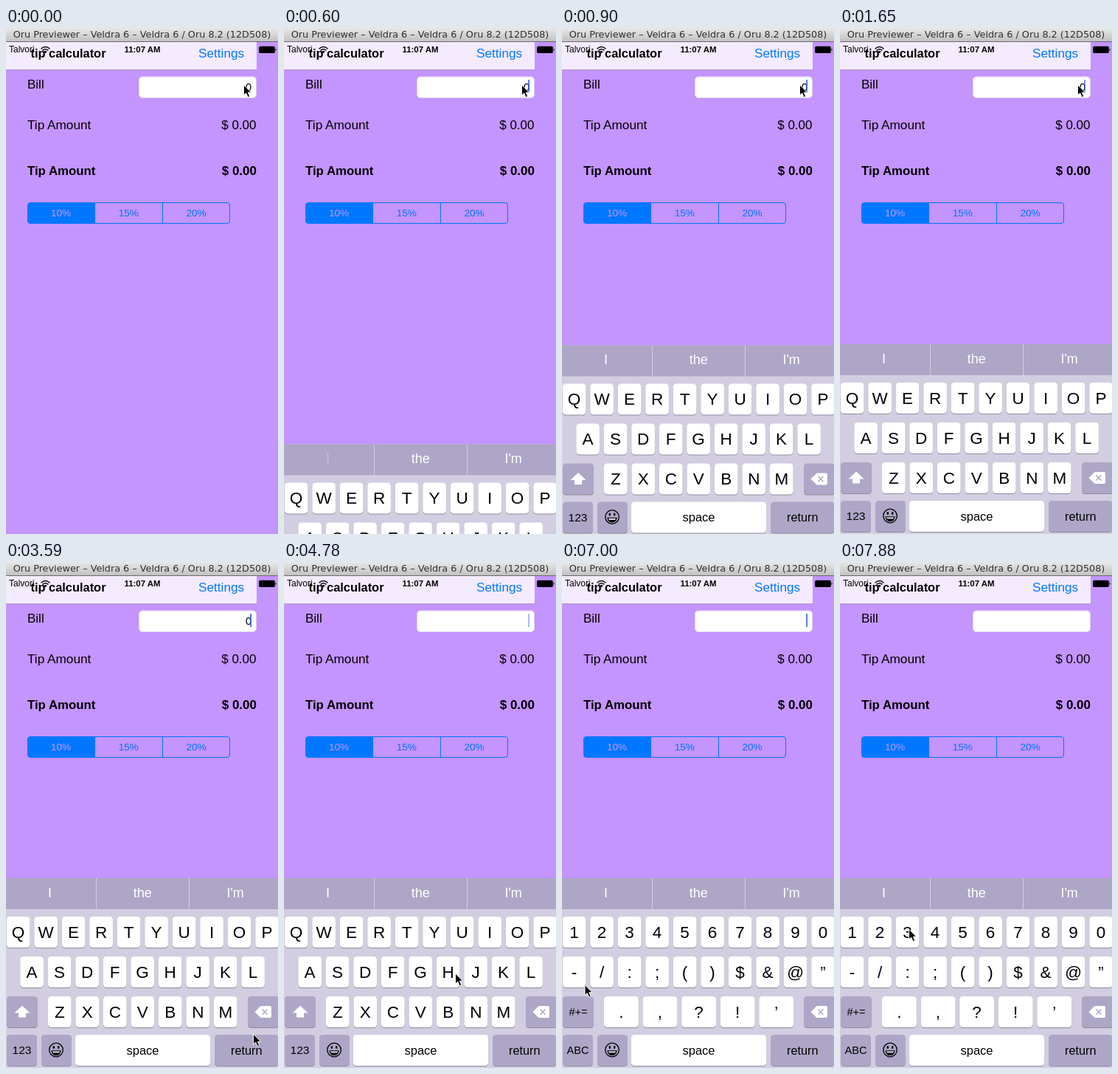
Write an HTML page that moves like this. It is 369x685 px and loops after 8 s.

```html
<!DOCTYPE html>
<html lang="en">
<head>
<meta charset="utf-8">
<title>Tip calculator</title>
<style>
html, body { margin: 0; width: 100%; height: 100%; overflow: hidden; background: #c494ff; }
svg { display: block; width: 100%; height: 100%; }
text { font-family: "Liberation Sans", Arial, sans-serif; white-space: pre; }
.b { font-weight: bold; }
</style>
</head>
<body>
<svg id="stage" viewBox="0 0 369 685">
  <defs>
    <linearGradient id="chrome" x2="0" y2="1">
      <stop offset="0" stop-color="#e8e8e8"/><stop offset="1" stop-color="#c2c2c2"/>
    </linearGradient>
  </defs>
  <rect width="369" height="685" fill="#c494ff"/>
  <g id="app"></g>
  <g id="keyboard"></g>
  <g id="pointer">
    <path d="M0 0V14L3.2 11.1L5.7 16.7L8.2 15.6L5.8 10.2H10.2Z" stroke="#fff" stroke-width="1" stroke-linejoin="round"/>
  </g>
</svg>
<script>
const LOOP = 8000, STEP = 148.6;
const BLUE = '#0077ff', LILAC = '#aea6c6', PALE = '#d2cde0', BG = '#c494ff';
const $ = id => document.getElementById(id);

function add(parent, tag, attrs, label) {
  const el = document.createElementNS('http://www.w3.org/2000/svg', tag);
  for (const k in attrs) el.setAttribute(k, attrs[k]);
  if (label !== undefined) el.textContent = label;
  parent.appendChild(el);
  return el;
}
const rect = (p, x, y, width, height, fill, more) =>
  add(p, 'rect', { x, y, width, height, fill, ...more });
const path = (p, d, attrs) => add(p, 'path', { d, ...attrs });
const write = (p, label, x, y, size, anchor = 'start', more) =>
  add(p, 'text', { x, y, 'font-size': size, 'text-anchor': anchor, ...more }, label);

// App screen
const app = $('app'), bold = { class: 'b' };
rect(app, 0, 19, 340, 37, '#f4ebfe');
rect(app, 0, 56, 340, 1, '#b49bd0');
write(app, 'tip calculator', 33.5, 40, 16.4, 'start', bold);
write(app, 'Settings', 261, 40, 17.2, 'start', { fill: BLUE });
write(app, 'Talvori', 4, 33, 12);
write(app, '11:07 AM', 185, 33, 11.4, 'middle', bold);
const wifi = { fill: 'none', stroke: '#000', 'stroke-width': 1.5 };
path(app, 'M47.5 28.2Q53.5 22.8 59.5 28.2M49.6 30.4Q53.5 27 57.4 30.4', wifi);
path(app, 'M53.5 34.2L51.2 31.9Q53.5 30.2 55.8 31.9Z');
rect(app, 343.2, 24.8, 21.6, 9.2, '#000', { rx: 1.6 });
path(app, 'M365.6 27.6Q367.8 29.4 365.6 31.2Z');

rect(app, 0, 0, 369, 18, 'url(#chrome)');
rect(app, 0, 18, 369, 1, '#6d6676');
write(app, 'Oru Previewer – Veldra 6 – Veldra 6 / Oru 8.2 (12D508)', 184.5, 13, 12.8, 'middle',
  { fill: '#303030', style: 'font-family:"DejaVu Sans",sans-serif' });

write(app, 'Bill', 29, 81.5, 17);
write(app, 'Tip Amount', 29, 136.5, 17.2);
write(app, '$ 0.00', 339.5, 136.5, 17, 'end');
write(app, 'Tip Amount', 29, 199, 16.8, 'start', bold);
write(app, '$ 0.00', 340, 199, 17, 'end', bold);
rect(app, 180.5, 66, 159, 28.5, '#fff', { rx: 4.5, stroke: '#e2d3f3' });
const amount = write(app, '0', 333, 84.5, 14.5, 'end');
const caret = rect(app, 331.3, 70, 1.7, 18, '#3f66ea');

rect(app, 29.5, 236.5, 274, 28, 'none', { rx: 3.5, stroke: BLUE });
path(app, 'M121 236.5H33Q29.5 236.5 29.5 240V261Q29.5 264.5 33 264.5H121Z', { fill: BLUE });
rect(app, 212, 236.5, 1, 28, BLUE);
['10%', '15%', '20%'].forEach((s, i) =>
  write(app, s, 74.5 + i * 91.8, 255, 13.6, 'middle', { fill: i ? BLUE : BG }));

// Keyboard
const kb = $('keyboard');
rect(kb, 0, 428, 369, 257, PALE);
rect(kb, 0, 428, 369, 42, LILAC);
rect(kb, 122, 428, 1, 42, PALE);
rect(kb, 248, 428, 1, 42, PALE);
const [hint] = ['I', 'the', "I'm"].map((s, i) =>
  write(kb, s, 59.5 + i * 125.8, 453.7, 18, 'middle', { fill: '#fff' }));

function key(p, x, y, w, label = '', size = 22.5, fill = '#fff') {
  rect(p, x, y + 1, w, 42, '#918b9f', { rx: 4.5 });
  const face = rect(p, x, y, w, 42, fill, { rx: 4.5 });
  write(p, label, x + w / 2, y + 21 + size * 0.35, size, 'middle');
  return face;
}
const row = (p, chars, x, y, w, pitch) =>
  [...chars].forEach((c, i) => key(p, x + i * pitch, y, w, c));

const letters = add(kb, 'g'), digits = add(kb, 'g');
row(letters, 'QWERTYUIOP', 0.8, 480, 31.6, 37.5);
row(letters, 'ASDFGHJKL', 19.3, 534, 31.6, 37.5);
row(letters, 'ZXCVBNM', 57, 588, 31.6, 37.5);
key(letters, 1, 588, 42, '', 16, LILAC);
path(letters, 'M22 600.5L32.5 610.5H27V616.5H17V610.5H11.5Z', { fill: '#fff' });
key(letters, 1, 640, 41, '123', 15.5, LILAC);

row(digits, '1234567890', 0.8, 480, 31.6, 37.5);
row(digits, '-/:;()$&@”', 0.8, 534, 31.6, 37.5);
row(digits, '.,?!’', 57, 588, 46.8, 52.6);
key(digits, 1, 588, 42, '#+=', 14.5, LILAC);
const modeKey = key(digits, 1, 640, 41, 'ABC', 14.5, LILAC);

const delKey = key(kb, 328, 588, 43, '', 16, LILAC);
const delIcon = path(kb, 'M337.5 609L345 601.5Q345.6 601 346.5 601H358Q360 601 360 603V615Q360 617 358 617H346.5Q345.6 617 345 616.5Z');
const delCross = path(kb, 'M347.5 605.5L354.5 612.5M354.5 605.5L347.5 612.5', { 'stroke-width': 1.5 });
key(kb, 48, 640, 41, '', 16, LILAC);
add(kb, 'circle', { cx: 68, cy: 660.5, r: 9.3, fill: 'none', stroke: '#000', 'stroke-width': 1.3 });
add(kb, 'ellipse', { cx: 64.8, cy: 657, rx: 1.3, ry: 2 });
add(kb, 'ellipse', { cx: 71.2, cy: 657, rx: 1.3, ry: 2 });
path(kb, 'M61.3 661.2H74.7Q73.6 668 68 668Q62.4 668 61.3 661.2Z');
path(kb, 'M62.8 662.3H73.2L72.2 664.6H63.8Z', { fill: PALE });
key(kb, 94, 640, 183, 'space', 16.5);
key(kb, 283, 640, 86.5, 'return', 16.3, LILAC);

// Timelines, counted in steps: pointer [step, x, y], caret [step, opacity]
const moves = [
  [17, 322.5, 77], [19, 316, 175], [21, 314.5, 390], [23, 329, 595], [24, 335.5, 639],
  [25, 336, 628], [26, 335, 615], [31, 335, 615], [32, 232.5, 557], [33, 125.5, 598],
  [34, 125.5, 598], [35, 98, 626], [37, 36, 653], [38, 32.5, 655], [44, 32.5, 655],
  [46, 29, 610], [48, 33, 535], [50, 49, 499], [53, 93.5, 497]
];
const blinks = [
  [0, 0], [4, 1], [8, .5], [9, 0], [11, .8], [14, .5], [15, 0], [17, 1], [20, .5], [21, 0],
  [23, 1], [26, .5], [27, 1], [32, .5], [33, 0], [35, 1], [38, .5], [39, 0], [40, 1],
  [43, .5], [44, 0], [47, 1], [50, .5], [51, 0]
];

function pointerAt(n) {
  const i = moves.findIndex(m => m[0] > n);
  if (i === 0) return moves[0].slice(1);
  if (i < 0) return moves[moves.length - 1].slice(1);
  const [a, ax, ay] = moves[i - 1], [b, bx, by] = moves[i], k = (n - a) / (b - a);
  return [ax + (bx - ax) * k, ay + (by - ay) * k];
}
const show = (el, on) => el.setAttribute('visibility', on ? 'visible' : 'hidden');

function render(t) {
  const n = Math.floor(t / STEP);
  const drop = n < 4 ? 257 : n < 8 ? 14.4 * Math.pow(9.4, 5 - n) : 0;
  kb.setAttribute('transform', `translate(0 ${drop.toFixed(1)})`);
  hint.setAttribute('opacity', n < 6 ? 0.3 : 1);
  show(amount, n < 27);
  caret.setAttribute('opacity', blinks.filter(b => b[0] <= n).pop()[1]);

  show(letters, n < 37);
  show(digits, n >= 37);
  modeKey.setAttribute('fill', n < 39 ? '#fff' : LILAC);
  const pressed = n >= 27 && n < 29;
  delKey.setAttribute('fill', pressed ? '#fff' : LILAC);
  delIcon.setAttribute('fill', pressed ? '#000' : '#fff');
  delCross.setAttribute('stroke', pressed ? '#fff' : LILAC);
  $('pointer').setAttribute('transform', `translate(${pointerAt(n)})`);
}

function frame() {
  render(performance.now() % LOOP);
  requestAnimationFrame(frame);
}
frame();
</script>
</body>
</html>
```
